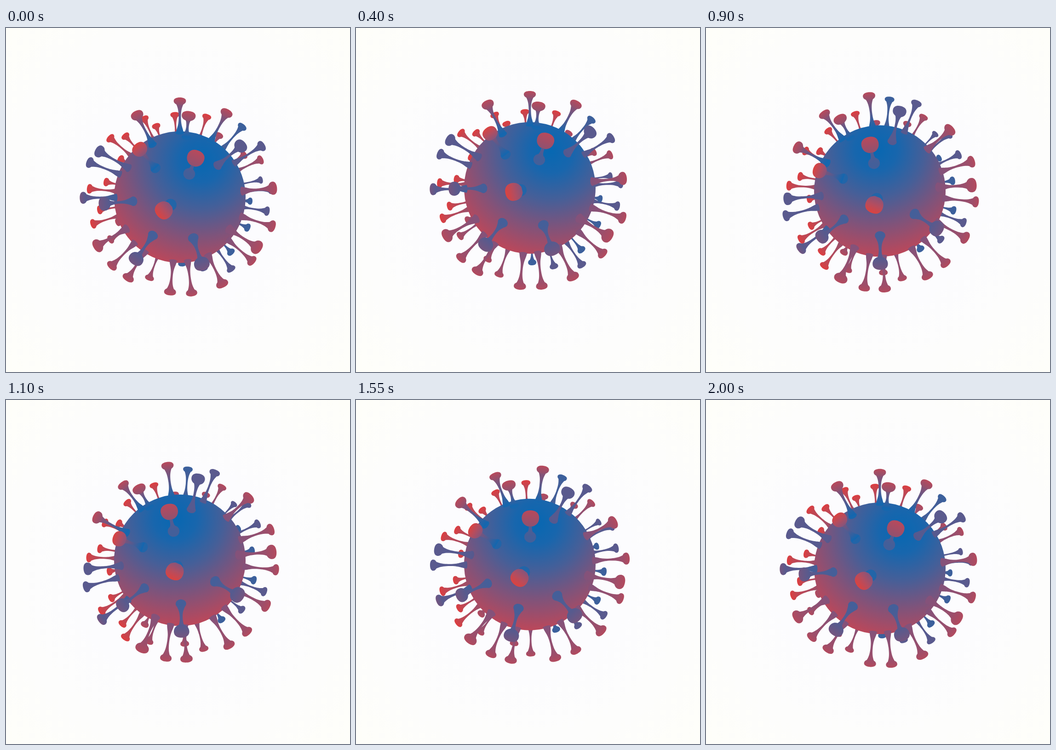
Write an HTML page without scripts that moves like this. It is 748 px wide and 748 px high and loops after 2050 ms.

```html
<!DOCTYPE html>
<html lang="en">
<head>
<meta charset="utf-8">
<title>Virus</title>
<style>
@property --t { syntax: "<number>"; inherits: true; initial-value: 0; }
@property --roll { syntax: "<number>"; inherits: true; initial-value: 0; }
@property --bob { syntax: "<number>"; inherits: true; initial-value: 1; }
@property --nod { syntax: "<number>"; inherits: true; initial-value: 0; }
@property --flat { syntax: "<number>"; inherits: true; initial-value: 0; }
@property --x { syntax: "<number>"; inherits: true; initial-value: 0; }
@property --y { syntax: "<number>"; inherits: true; initial-value: 0; }
@property --z { syntax: "<number>"; inherits: true; initial-value: 0; }
@property --r { syntax: "<number>"; inherits: true; initial-value: 1; }
@property --m { syntax: "<number>"; inherits: true; initial-value: 1; }
@property --size { syntax: "<number>"; inherits: true; initial-value: 12; }
@property --tip { syntax: "<number>"; inherits: true; initial-value: 200; }
@property --root { syntax: "<number>"; inherits: true; initial-value: 136; }

html, body { margin: 0; width: 100%; height: 100%; overflow: hidden; }
body { background: radial-gradient(circle, #fcfcfe 40%, #fdfdfc 70%, #fefef9 100%); }
svg { display: block; width: 100%; height: 100%; }

.virus {
  --s: 1;
  --l: 1;
  --bob: cos(var(--t) * 26.34deg - 8deg);
  --nod: calc(.055 * (var(--bob) - 1));
  transform: translate(378px, calc(1px * (357.4 + 10.5 * var(--bob))));
  animation: tick 2050ms steps(41) -2ms infinite, roll 2050ms -2ms infinite;
}
@keyframes tick { from { --t: 0; } to { --t: 41; } }
@keyframes roll {
  0% { --roll: 0; animation-timing-function: steps(1); }
  19.512% { --roll: 0; animation-timing-function: steps(4); }
  29.268% { --roll: 21.7; animation-timing-function: steps(6); }
  43.902% { --roll: 35.5; animation-timing-function: steps(4); }
  53.659% { --roll: 36.5; animation-timing-function: steps(4); }
  63.415% { --roll: 33.2; animation-timing-function: steps(4); }
  73.171% { --roll: 24; animation-timing-function: steps(5); }
  85.366% { --roll: 10; animation-timing-function: steps(3); }
  92.683% { --roll: 2.5; animation-timing-function: steps(2); }
  97.561%, 100% { --roll: 0; }
}
.body { transform: rotate(calc(30deg - 1deg * var(--roll))); }

/* --a: angle around the view axis, --e: lift toward the viewer */
.virus use {
  --flat: cos(var(--e) * 1deg);
  --x: calc(var(--flat) * cos((var(--a) - var(--roll)) * 1deg));
  --y: calc(var(--flat) * sin((var(--a) - var(--roll)) * 1deg) + var(--nod) * (sin(var(--e) * 1deg) - .32));
  --z: calc(sin(var(--e) * 1deg) - .5 * var(--nod) * var(--flat) * sin((var(--a) - var(--roll)) * 1deg));
  --r: hypot(var(--x), var(--y));
  --m: calc(1 / (1 - .3 * var(--z)));
  --size: calc(12.3 * var(--s) * pow(var(--m), 1.3));
  --tip: calc(200 * var(--l) * var(--r) * var(--m));
  --root: calc(136 * var(--r) / (1 - .2 * var(--z)));
  transform: rotate(atan2(var(--y), var(--x)));
}
.foot {
  fill: var(--foot);
  transform: translate(calc(1px * var(--root))) scale(calc(var(--size) * hypot(.15, .68 * var(--z))), calc(.68 * var(--size)));
}
.stem {
  fill: var(--stem);
  transform: translate(calc(1px * var(--root))) scale(calc(var(--tip) - var(--root)), var(--size));
}
.head {
  fill: var(--head);
  transform: translate(calc(1px * var(--tip))) scale(calc(var(--size) * hypot(.6 * var(--r), .98 * var(--z))), var(--size));
}
.back { --s: .87; }
.small { --s: .88; }
.mix { --foot: #1767ad; --stem: url(#mix-stem); --head: url(#mix-head); }
.knob { --foot: #445f99; --stem: url(#plum-stem); --head: url(#mix-head); }
.hot { --foot: #2265a8; --stem: url(#mix-stem); --head: url(#hot-head); }
.red { --foot: #a94b60; --stem: url(#red-stem); --head: url(#red-head); }
.rose { --foot: #84527a; --stem: url(#rose-stem); --head: url(#rose-head); }
.plum { --foot: #445f99; --stem: url(#plum-stem); --head: url(#plum-head); }
.dusk { --foot: #56598e; --stem: #575a8f; --head: #5a5a8e; }
.blue { --foot: #2c64a5; --stem: #435f99; --head: #3c609c; }
</style>
</head>
<body>
<svg viewBox="0 0 748 748">
  <defs>
    <radialGradient id="skin" gradientUnits="userSpaceOnUse" cx="0" cy="-92" r="236">
      <stop offset="0" stop-color="#0768b2"/>
      <stop offset=".2" stop-color="#1866ad"/>
      <stop offset=".45" stop-color="#465f98"/>
      <stop offset=".71" stop-color="#80537a"/>
      <stop offset="1" stop-color="#bd4759"/>
    </radialGradient>
    <linearGradient id="mix-stem"><stop stop-color="#1167b0"/><stop offset=".45" stop-color="#535b90"/><stop offset="1" stop-color="#95506e"/></linearGradient>
    <linearGradient id="mix-head"><stop stop-color="#90516f"/><stop offset="1" stop-color="#b9495b"/></linearGradient>
    <linearGradient id="hot-head"><stop stop-color="#87547a"/><stop offset=".5" stop-color="#b44d5f"/><stop offset="1" stop-color="#dc423f"/></linearGradient>
    <linearGradient id="red-stem"><stop stop-color="#98506c"/><stop offset="1" stop-color="#c9454f"/></linearGradient>
    <linearGradient id="red-head"><stop stop-color="#c5464f"/><stop offset="1" stop-color="#dd3d40"/></linearGradient>
    <linearGradient id="rose-stem"><stop stop-color="#84527a"/><stop offset="1" stop-color="#a04e69"/></linearGradient>
    <linearGradient id="rose-head"><stop stop-color="#9d4e6a"/><stop offset="1" stop-color="#b34a5e"/></linearGradient>
    <linearGradient id="plum-stem"><stop stop-color="#445f99"/><stop offset="1" stop-color="#61588a"/></linearGradient>
    <linearGradient id="plum-head"><stop stop-color="#535b90"/><stop offset="1" stop-color="#74557f"/></linearGradient>
    <g id="k">
      <circle class="foot" r="1"/>
      <path class="stem" d="M0-.62C.2-.48.2-.2.5-.18C.78-.2.84-.42 1-.82V.82C.84.42.78.2.5.18C.2.2.2.48 0 .62Z"/>
      <path class="head" d="M-.95-.3C-.8-.75-.4-1.02.15-1C.75-.97 1-.53 1 0C1 .53.75.97.15 1C-.4 1.02-.8.75-.95.3Z"/>
    </g>
  </defs>
  <g class="virus">
    <g class="back">
      <g class="red">
        <use href="#k" style="--a:162.9;--e:-3"/>
        <use href="#k" style="--a:171;--e:-17"/>
        <use href="#k" style="--a:-174.7;--e:-3"/>
        <use href="#k" style="--a:-168.4;--e:-24"/>
        <use href="#k" style="--a:-147.2;--e:-29"/>
        <use href="#k" style="--a:-139.7;--e:-2"/>
        <use href="#k" style="--a:-131.7;--e:-16"/>
        <use href="#k" style="--a:-114.4;--e:-10"/>
        <use href="#k" style="--a:-108.4;--e:-24"/>
        <use href="#k" style="--a:-93.5;--e:-15"/>
        <use href="#k" style="--a:-71.5;--e:-12"/>
      </g>
      <g class="rose">
        <use href="#k" style="--a:158;--e:-33"/>
        <use href="#k" style="--a:148.6;--e:-17"/>
        <use href="#k" style="--a:122.9;--e:-22"/>
        <use href="#k" style="--a:110.6;--e:-10"/>
        <use href="#k" style="--a:-57.5;--e:-26"/>
        <use href="#k" style="--a:-33.4;--e:-22"/>
        <use href="#k" style="--a:-24.8;--e:-6"/>
      </g>
      <g class="dusk">
        <use href="#k" style="--a:-12;--e:-15;--s:.72"/>
        <use href="#k" style="--a:-5;--e:-2"/>
        <use href="#k" style="--a:9.1;--e:-7"/>
        <use href="#k" style="--a:54.5;--e:-7"/>
        <use href="#k" style="--a:71.5;--e:-24"/>
      </g>
      <g class="blue">
        <use href="#k" style="--a:-48.5;--e:11;--l:.98;--s:.8"/>
        <use href="#k" style="--a:3.2;--e:-29;--s:.75"/>
        <use href="#k" style="--a:24.2;--e:-25"/>
        <use href="#k" style="--a:47.1;--e:-24"/>
        <use href="#k" style="--a:88;--e:-33"/>
      </g>
    </g>
    <circle class="body" r="143" fill="url(#skin)"/>
    <g class="rose">
      <use href="#k" style="--a:95.9;--e:8"/>
      <use href="#k" style="--a:122.6;--e:10"/>
      <use href="#k" style="--a:134.7;--e:15;--s:.9"/>
      <use href="#k" style="--a:149.4;--e:26"/>
      <use href="#k" style="--a:83;--e:15;--s:.9"/>
      <use href="#k" style="--a:64;--e:15"/>
      <use href="#k" style="--a:41.5;--e:12;--s:.9"/>
      <use href="#k" style="--a:17.5;--e:15;--s:.95"/>
      <use href="#k" style="--a:33;--e:34"/>
      <use href="#k" style="--a:-5.5;--e:22;--l:.97"/>
    </g>
    <g class="dusk small">
      <use href="#k" style="--a:-32;--e:14"/>
      <use href="#k" style="--a:-159;--e:15"/>
      <use href="#k" style="--a:-150.4;--e:33"/>
      <use href="#k" style="--a:-40;--e:48"/>
    </g>
    <g class="plum small">
      <use href="#k" style="--a:179.6;--e:15;--s:.95"/>
      <use href="#k" style="--a:175;--e:51"/>
      <use href="#k" style="--a:125.2;--e:51;--s:.95"/>
      <use href="#k" style="--a:71.8;--e:55;--s:.96"/>
    </g>
    <g class="mix">
      <use href="#k" style="--a:-90;--e:12"/>
      <use href="#k" style="--a:-117.5;--e:33;--s:.9"/>
      <use href="#k" style="--a:-83.8;--e:30;--l:.87"/>
      <use href="#k" style="--a:-61;--e:22;--s:.95"/>
    </g>
    <use class="knob" href="#k" style="--a:-68;--e:71"/>
    <g class="hot">
      <use href="#k" style="--a:-130;--e:60;--s:.92"/>
      <use href="#k" style="--a:140.5;--e:81"/>
    </g>
  </g>
</svg>
</body>
</html>
```
